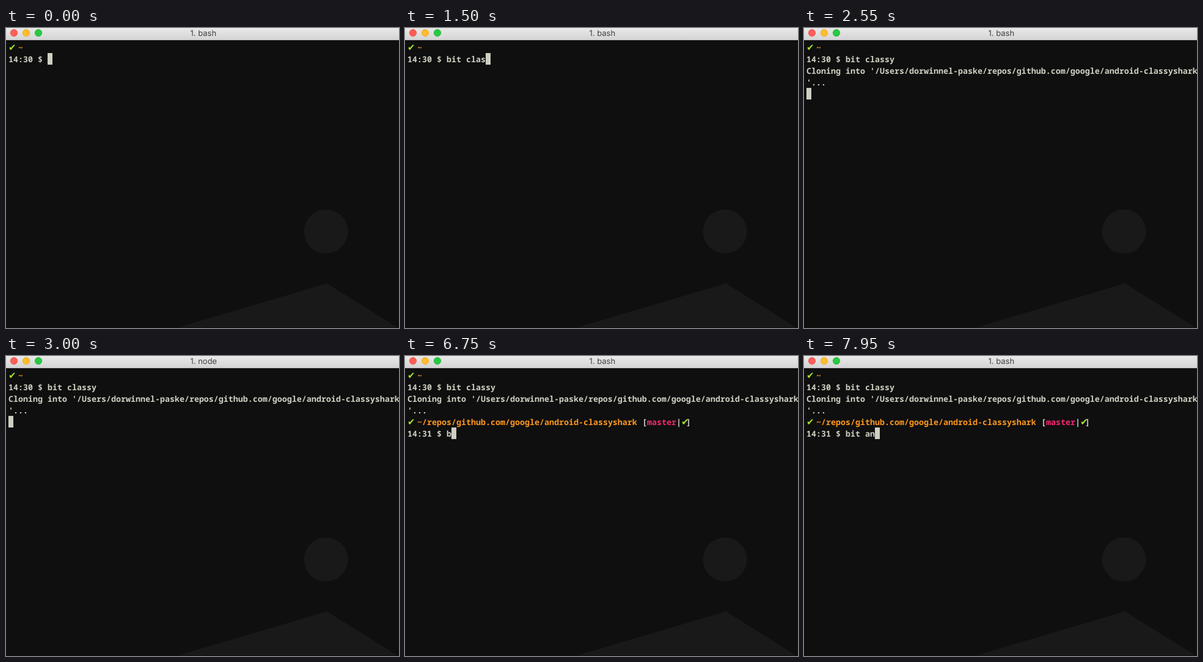
An HTML page for the animation above (8000 ms loop, 643x491 px).

```html
<!DOCTYPE html>
<html lang="en">
<head>
<meta charset="utf-8">
<title>Terminal</title>
<style>
  html, body { margin: 0; width: 100%; height: 100%; overflow: hidden; background: #0f0f0f; }
  svg { display: block; width: 643px; height: 491px; }
  text { white-space: pre; text-rendering: geometricPrecision; }
  .mono { font: 600 13.333px "Noto Sans Mono", "DejaVu Sans Mono", monospace; }
  .tick { font: 15px "DejaVu Sans", sans-serif; }
  .title { font: 13px Inter, Roboto, sans-serif; }
</style>
</head>
<body>
<svg viewBox="0 0 643 491">
  <defs>
    <linearGradient id="bar" x1="0" y1="0" x2="0" y2="1">
      <stop offset="0" stop-color="#e9e9e9"/>
      <stop offset="1" stop-color="#d3d3d3"/>
    </linearGradient>
  </defs>
  <rect width="643" height="491" fill="#0f0f0f"/>
  <circle cx="523.5" cy="333" r="36" fill="#191919"/>
  <path d="M282 490 L525 418 L640 490Z" fill="#191919"/>
  <rect width="643" height="20" fill="url(#bar)"/>
  <rect y="19" width="643" height="1" fill="#bdbdbd"/>
  <g stroke-width=".7">
    <circle cx="13" cy="8" r="5.7" fill="#ff5f57" stroke="#e2463f"/>
    <circle cx="33" cy="8" r="5.7" fill="#ffbd2e" stroke="#e1a116"/>
    <circle cx="53" cy="8" r="5.7" fill="#28c940" stroke="#12ac28"/>
  </g>
  <text id="title" class="title" x="301.5" y="13" fill="#404040"></text>
  <g id="rows"></g>
  <rect id="cursor" width="8" height="19" fill="#cfcfc2"/>
</svg>
<script>
const LOOP = 8000, COL = 8, ROW = 19, LEFT = 4, TOP = 22;
const PLAIN = '#cfcfc2', ORANGE = '#fd971f', PINK = '#f92672', GREEN = '#a6e22e';
const $ = id => document.getElementById(id);
const rows = $('rows');

// Adds text at a character cell and returns its element.
function put(row, col, str, fill = PLAIN, kind = 'mono') {
  const el = document.createElementNS('http://www.w3.org/2000/svg', 'text');
  el.setAttribute('class', kind);
  el.setAttribute('x', LEFT + col * COL);
  el.setAttribute('y', TOP + row * ROW + 15);
  el.setAttribute('fill', fill);
  el.textContent = str;
  rows.appendChild(el);
  return el;
}
const tick = (row, col) => put(row, col, '✔', GREEN, 'tick');

tick(0, 0);
put(0, 2, '~', ORANGE);
put(1, 0, '14:30 $ ');
const first = put(1, 8, '');

const cloning = [
  put(2, 0, "Cloning into '/Users/dorwinnel-paske/repos/github.com/google/android-classyshark"),
  put(3, 0, "'...")
];
const prompt = [
  tick(4, 0),
  put(4, 2, '~/repos/github.com/google/android-classyshark', ORANGE),
  put(4, 48, '['),
  put(4, 49, 'master', PINK),
  put(4, 55, '|'),
  tick(4, 56),
  put(4, 57, ']'),
  put(5, 0, '14:31 $ ')
];
const second = put(5, 8, '');

// Each key is [time, number of characters typed].
const keys1 = [[750, 1], [900, 3], [1200, 5], [1350, 6], [1500, 8], [1650, 9], [1800, 10]];
const keys2 = [[6750, 1], [6900, 3], [7500, 4], [7800, 5], [7950, 6]];
const typed = (keys, t) => keys.reduce((n, [at, count]) => t >= at ? count : n, 0);
const show = (list, on) => list.forEach(el => el.setAttribute('visibility', on ? 'visible' : 'hidden'));

function draw(t) {
  const n1 = typed(keys1, t), n2 = typed(keys2, t);
  first.textContent = 'bit classy'.slice(0, n1);
  second.textContent = 'bit an'.slice(0, n2);
  show(cloning, t >= 2550);
  show(prompt, t >= 5850);
  $('title').textContent = t >= 3000 && t < 6600 ? '1. node' : '1. bash';

  let row = 1, col = 8 + n1;
  if (t >= 5850) { row = 5; col = 8 + n2; }
  else if (t >= 2100) { row = t < 2550 ? 2 : 4; col = 0; }
  $('cursor').setAttribute('x', LEFT + col * COL);
  $('cursor').setAttribute('y', TOP + row * ROW);
}

const start = performance.now();
function frame() {
  draw((performance.now() - start) % LOOP);
  requestAnimationFrame(frame);
}
frame();
</script>
</body>
</html>
```
